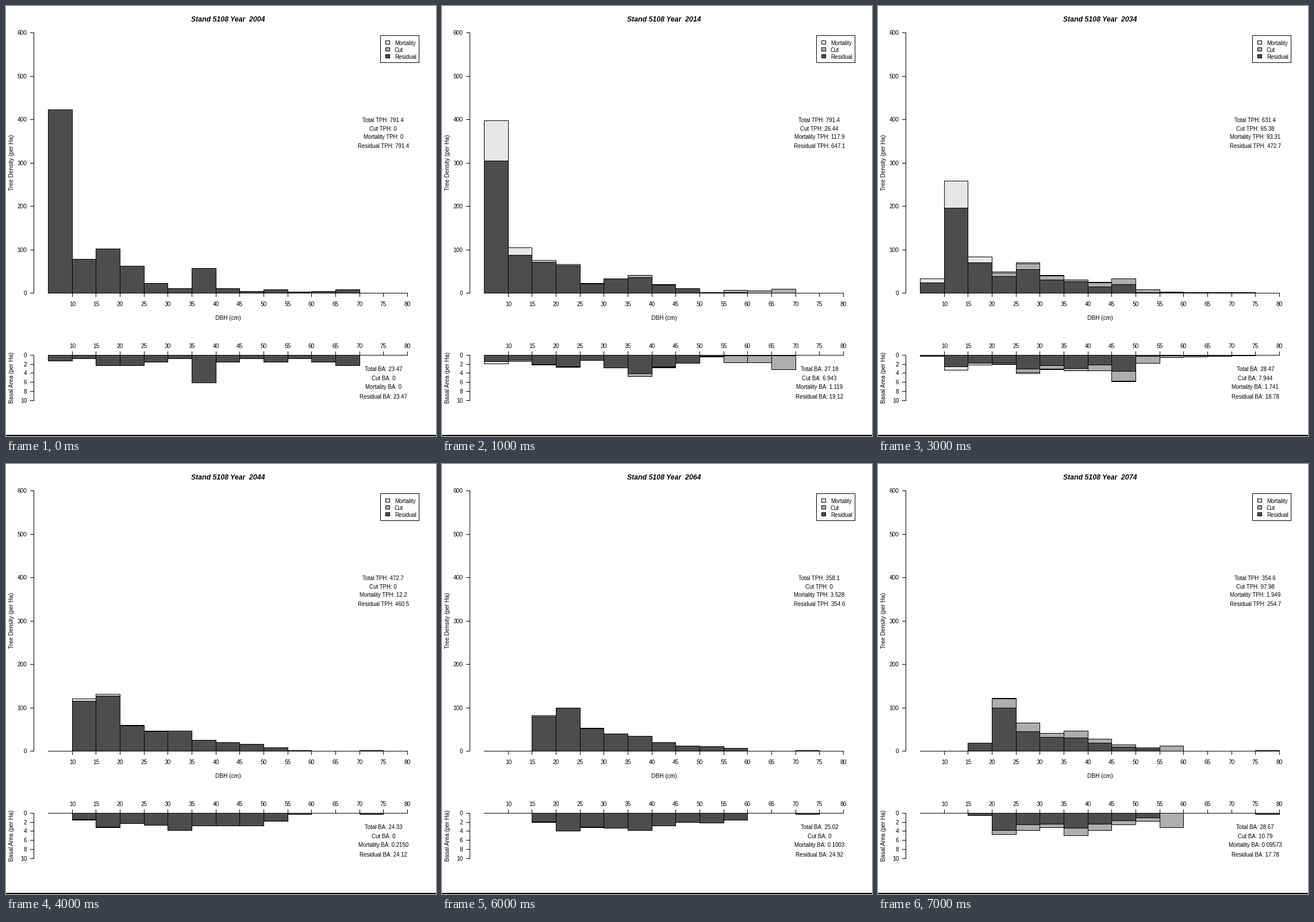
A matplotlib script for the animation above (8 s loop, 748x748 px).

```python
import math

import matplotlib.pyplot as plt
from matplotlib.animation import FuncAnimation
from matplotlib.patches import Rectangle

SIZE = 748
DPI = 100
PX = 72 / DPI  # points per pixel

RESIDUAL, CUT, MORTALITY = "#4d4d4d", "#aeaeae", "#e6e6e6"
COLORS = (RESIDUAL, CUT, MORTALITY)

plt.rcParams["font.family"] = "Liberation Sans"
fig = plt.figure(figsize=(SIZE / DPI, SIZE / DPI), dpi=DPI, facecolor="white")
ax = fig.add_axes([0, 0, 1, 1])
ax.set_xlim(0, SIZE)
ax.set_ylim(SIZE, 0)
ax.axis("off")


def snap(v):
    return math.floor(v + 0.5) + 0.5


def x_at(dbh):
    return snap(73.2 + (dbh - 5) * 8.328)


def y_density(v):
    return snap(499 - v * 0.7545)


def y_basal(v):
    return snap(607 + v * 7.87)


def line(x0, y0, x1, y1):
    ax.plot([x0, x1], [y0, y1], color="black", lw=PX, snap=False,
            solid_capstyle="projecting", zorder=3)


def box(x0, y0, x1, y1, fill):
    return ax.add_patch(Rectangle((x0, y0), x1 - x0, y1 - y0, facecolor=fill,
                                  edgecolor="black", lw=PX, snap=False,
                                  joinstyle="miter", zorder=2))


def label(x, y, s, size=10.1, ha="center", **kw):
    return ax.text(x, y, s, fontsize=size * PX, ha=ha, va="baseline",
                   color="black", **kw)


def tree_area(i):
    """Basal area in square metres of one tree in size class i."""
    return math.pi / 40000 * (7.5 + 5 * i) ** 2


class Survey:
    """Stacked classes of one year; cut and dead map class index to density."""

    def __init__(self, density, cut, dead, basal, tph, ba):
        self.text = tph + ba
        basal = basal or [n * tree_area(i) for i, n in enumerate(density)]
        self.density, self.basal = [], []
        for i, (n, b) in enumerate(zip(density, basal)):
            c, d = cut.get(i, 0), dead.get(i, 0)
            self.density.append((n, c, d))
            self.basal.append((b, c * tree_area(i), d * tree_area(i)))


surveys = [
    Survey([423, 78.5, 102, 62.5, 23, 10.5, 57.5, 10.5, 4.5, 7.5, 3, 4.5, 7.5],
           {}, {},
           [1.25, .77, 2.3, 2.3, 1.55, .77, 6.1, 1.55, .77, 1.55, .77, 1.55, 2.3],
           ("791.4", "0", "0", "791.4"), ("23.47", "0", "0", "23.47")),
    Survey([305, 88, 71, 63.5, 21.5, 33, 36, 18.5, 10, 1, .7, .5, .5],
           {6: 5, 7: 1, 9: .7, 10: 6, 11: 5, 12: 8.5},
           {0: 92, 1: 17, 2: 5, 3: 3, 4: .8, 6: .7, 7: .7},
           [1.45, 1.15, 2.05, 2.55, 1.1, 2.75, 4.1, 2.5, 1.75, .25, .1, .1, .1],
           ("791.4", "26.44", "117.9", "647.1"),
           ("27.18", "6.943", "1.119", "19.12")),
    Survey([135, 180, 65, 92, 61, 11.5, 27.5, 41, 10.5, 8.5, 1.3, 0, .7],
           {}, {0: 5.5, 1: 6.5, 2: 1.3, 3: 1, 9: .5},
           [.85, 1.9, 1.35, 3.7, 3.6, 1, 2.8, 5.8, 1.8, 1.65, .3, 0, .3],
           ("647.1", "0", "15.66", "631.4"),
           ("25.08", "0", "0.2090", "24.87")),
    Survey([24, 196, 70, 38, 54, 30, 26, 15, 20.5, 1.3, .7, .4, .7, .7],
           {3: 8, 4: 13, 5: 10, 6: 4.5, 7: 9, 8: 12, 9: 7, 10: 1.5, 11: 1},
           {0: 9, 1: 62.5, 2: 13.5, 3: 3, 4: 3, 5: .7, 6: .5, 7: .7, 8: .6},
           [.22, 2.5, 1.8, 1.65, 3.1, 2.25, 2.9, 2.1, 3.55, .25, .07, .07, .25, .07],
           ("631.4", "65.38", "93.31", "472.7"),
           ("28.47", "7.944", "1.741", "18.78")),
    Survey([0, 115, 127, 58, 45, 46, 25, 20, 15.5, 8, 1, 0, 0, .7],
           {}, {1: 6, 2: 4, 3: 1, 4: .8, 5: .4}, None,
           ("472.7", "0", "12.2", "460.5"),
           ("24.33", "0", "0.2150", "24.12")),
    Survey([0, 33, 134, 63, 33, 40, 24, 15.5, 9.5, 11, 0, 0, 0, .7],
           {2: 5, 3: 1.5, 4: 5, 5: 20, 6: 13, 7: 7, 8: 7, 9: 8, 10: 3},
           {1: 6, 2: 17.5, 3: 3.5, 4: 2.5, 5: .7, 6: .7, 7: .3},
           [0, .5, 3.3, 2.5, 1.9, 3.15, 2.5, 2.1, 1.7, 2.3, 0, 0, 0, .3],
           ("460.5", "71.4", "30.98", "358.1"),
           ("28.77", "8.49", "0.982", "19.30")),
    Survey([0, 0, 80, 99, 52, 40, 35, 20, 11.5, 10, 6, 0, 0, .7],
           {}, {2: 2, 3: 1, 4: .5}, None,
           ("358.1", "0", "3.528", "354.6"),
           ("25.02", "0", "0.1003", "24.92")),
    Survey([0, 0, 19, 99, 45.5, 32, 30, 18.5, 9.5, 5, 0, 0, 0, 0, .7],
           {3: 21.5, 4: 20, 5: 8.5, 6: 16, 7: 9.5, 8: 5, 9: 3.5, 10: 12},
           {3: 1.3},
           [0, 0, .5, 3.8, 2.6, 2.45, 3.25, 2.45, 1.6, 1.05, 0, 0, 0, 0, .3],
           ("354.6", "97.98", "1.949", "254.7"),
           ("28.67", "10.79", "0.09573", "17.78")),
]


def draw_axes():
    line(x_at(5), y_density(0), x_at(80), y_density(0))
    line(x_at(5), y_basal(0), x_at(80), y_basal(0))
    for dbh in range(10, 81, 5):
        x = x_at(dbh)
        line(x, y_density(0), x, y_density(0) + 6)
        line(x, y_basal(0), x, y_basal(0) - 6)
        label(x, 522, dbh)
        label(x, 595, dbh)
    for y_of, top, step in ((y_density, 600, 100), (y_basal, 10, 2)):
        line(48.5, y_of(0), 48.5, y_of(top))
        for v in range(0, top + 1, step):
            line(42.5, y_of(v), 48.5, y_of(v))
            label(36.5, y_of(v) + 3.5, v, ha="right")
    label(386, 546, "DBH (cm)")
    side = dict(rotation=90, rotation_mode="anchor")
    label(13, 272.5, "Tree Density (per Ha)", **side)
    label(13, 646.5, "Basal Area (per Ha)", **side)


def draw_legend():
    box(651.5, 51.5, 718.5, 98.5, "white")
    names = ("Mortality", "Cut", "Residual")
    for i, (name, fill) in enumerate(zip(names, COLORS[::-1])):
        y = 60.5 + 12 * i
        box(660.5, y, 667.5, y + 6, fill)
        label(676, y + 7, name, 9.8, ha="left")


draw_axes()
draw_legend()
ax.add_patch(Rectangle((0, 746), SIZE, 2, facecolor="black", lw=0))

title = label(386, 27, "", 12.2, weight="bold", style="italic")
KINDS = ("Total", "Cut", "Mortality", "Residual")
captions = [f"{kind} {unit}: " for unit in ("TPH", "BA") for kind in KINDS]
notes = [label(656.3, y, "", 9.75)
         for y in (202, 217, 231, 247, 635, 651, 666, 683)]
bars = []


def draw_stacks(classes, y_of):
    for i, parts in enumerate(classes):
        base = 0
        for part, fill in zip(parts, COLORS):
            if part > 0:
                bars.append(box(x_at(5 + 5 * i), y_of(base),
                                x_at(10 + 5 * i), y_of(base + part), fill))
            base += part


def update(step):
    while bars:
        bars.pop().remove()
    survey = surveys[step]
    title.set_text(f"Stand 5108 Year  {2004 + 10 * step}")
    draw_stacks(survey.density, y_density)
    draw_stacks(survey.basal, y_basal)
    for note, caption, value in zip(notes, captions, survey.text):
        note.set_text(caption + value)
    return bars + notes + [title]


anim = FuncAnimation(fig, update, frames=len(surveys), interval=1000,
                     init_func=lambda: [], repeat=True, repeat_delay=0,
                     blit=False)
plt.show()
```
